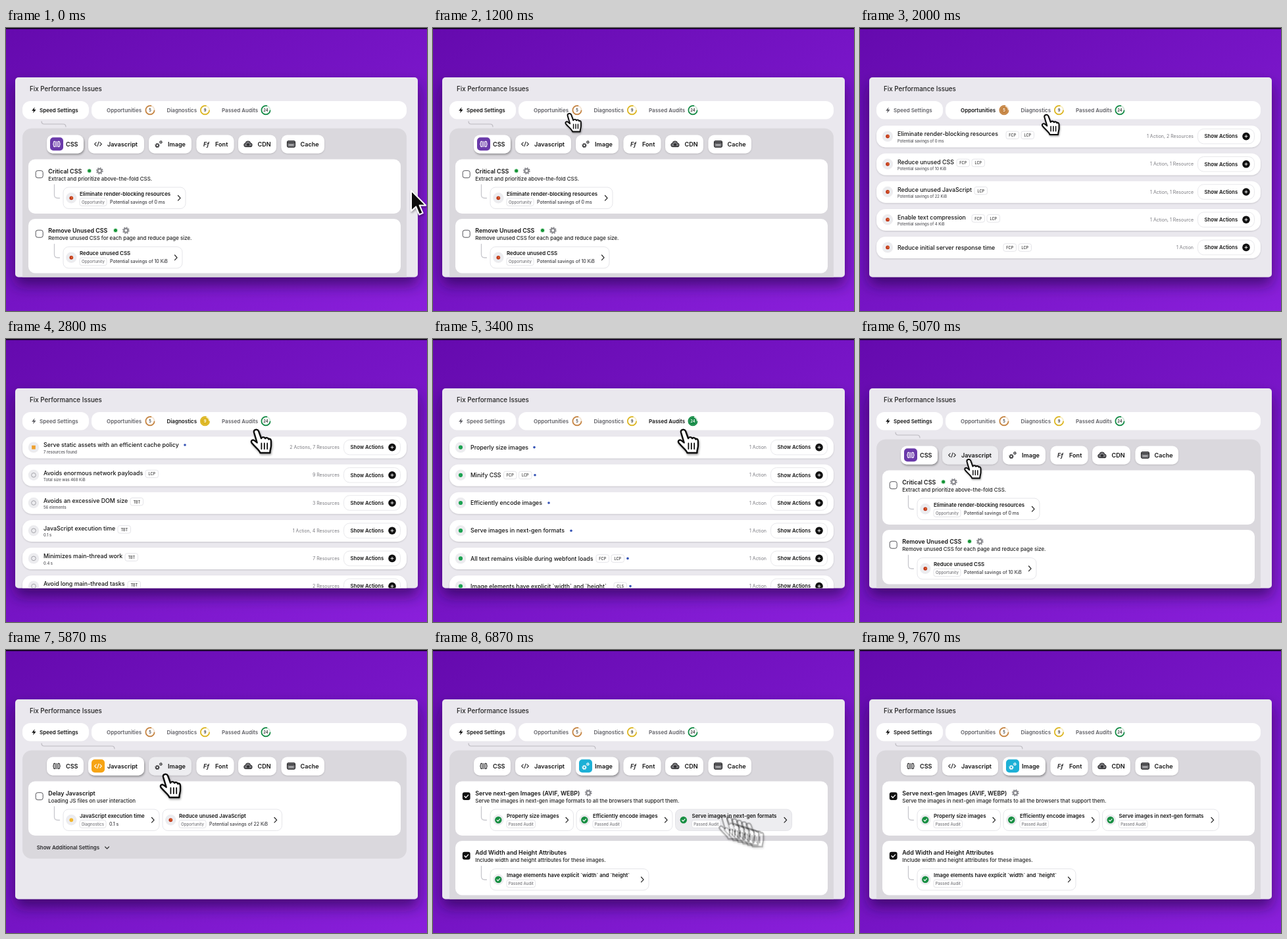
Recreate the animation shown at these times as an HTML page. Size 640 by 430 pixels, loop 8070 ms.

```html
<!DOCTYPE html>
<html lang="en">
<head>
<meta charset="utf-8">
<title>Fix Performance Issues</title>
<style>
html, body { margin: 0; width: 100%; height: 100%; overflow: hidden; background: #6f10bd; }
svg { display: block; width: 640px; height: 430px; font-family: Inter, "Open Sans", sans-serif; }
</style>
</head>
<body>
<svg id="stage" viewBox="0 0 640 430" xmlns="http://www.w3.org/2000/svg">
  <defs>
    <linearGradient id="bg" x1="0" y1="0" x2="1" y2="1">
      <stop offset="0" stop-color="#650aae"/>
      <stop offset=".5" stop-color="#7614c5"/>
      <stop offset="1" stop-color="#8a1fdb"/>
    </linearGradient>
    <filter id="deep" x="-10%" y="-10%" width="120%" height="130%">
      <feDropShadow dx="0" dy="12" stdDeviation="11" flood-color="#1c0038" flood-opacity=".6"/>
    </filter>
    <filter id="soft" x="-20%" y="-30%" width="140%" height="180%">
      <feDropShadow dx="0" dy="1" stdDeviation="1.2" flood-color="#000" flood-opacity=".16"/>
    </filter>
    <filter id="lift" x="-30%" y="-30%" width="160%" height="170%">
      <feDropShadow dx="1" dy="2" stdDeviation="1.5" flood-color="#000" flood-opacity=".35"/>
    </filter>
    <clipPath id="panel"><rect x="14" y="75" width="612" height="303.5" rx="5"/></clipPath>
  </defs>
  <rect width="640" height="430" fill="url(#bg)"/>
  <rect width="640" height="1.5" fill="#08000f"/>
  <rect x="14" y="75" width="612" height="303.5" rx="5" fill="#eae8ee" filter="url(#deep)"/>
  <g id="app" clip-path="url(#panel)"></g>
  <g id="pointer"></g>
</svg>
<script>
const LOOP = 8070;
const $ = id => document.getElementById(id);

// ---------- drawing helpers ----------
const txt = (x, y, s, size, weight = 500, fill = '#151515', extra = '') =>
  `<text x="${x}" y="${y}" font-size="${size}" font-weight="${weight}" fill="${fill}" ${extra}>${s.replace(/</g, '&lt;')}</text>`;
const box = (x, y, w, h, r, fill = '#fff', extra = '') =>
  `<rect x="${x}" y="${y}" width="${w}" height="${h}" rx="${r}" fill="${fill}" ${extra}/>`;
const dot = (x, y, r, fill, extra = '') => `<circle cx="${x}" cy="${y}" r="${r}" fill="${fill}" ${extra}/>`;
const line = (d, color = '#151515', w = 1.2) =>
  `<path d="${d}" fill="none" stroke="${color}" stroke-width="${w}" stroke-linecap="round" stroke-linejoin="round"/>`;
const at = (x, y, s) => `<g transform="translate(${x} ${y})">${s}</g>`;
const mid = 'text-anchor="middle"';
const edge = c => `stroke="${c}" stroke-width=".8"`;

const gear = (x, y, r = 4, c = '#8b8b90') =>
  `<circle cx="${x}" cy="${y}" r="${r * .75}" fill="none" stroke="${c}" stroke-width="${r * .55}"/>` +
  `<circle cx="${x}" cy="${y}" r="${r * 1.15}" fill="none" stroke="${c}" stroke-width="${r * .4}" stroke-dasharray="${r * .45}"/>`;

const badge = (x, y, w, s) =>
  box(x, y, w, 11.5, 3, '#fff', edge('#dddde2')) + txt(x + w / 2, y + 8.1, s, s.length < 4 ? 5.6 : 6.1, 500, s.length < 4 ? '#333' : '#77777c', mid);

const status = {
  red: dot(0, 0, 2.9, '#c23a1e') + dot(.7, -.3, 1, '#e8812c'),
  amber: box(-2.8, -2.8, 5.6, 5.6, .5, '#eea02f'),
  yellow: dot(0, 0, 2.9, '#f2b62c'),
  none: dot(0, 0, 3.3, 'none', 'stroke="#a5a5ab" stroke-width="1"'),
  green: dot(0, 0, 3.1, '#1da352'),
  pass: dot(0, 0, 5.2, '#178f42') + line('M-2.1 .2L-.6 1.8L2.3 -1.5', '#fff', 1.1)
};
const statusIcon = (x, y, kind) => dot(x, y, 8.2, '#ececef') + at(x, y, status[kind]);

// ---------- header ----------
const heads = [
  { label: 'Opportunities', x: 153, rx: 219, n: 5, color: '#c58442', pale: '#f3e2d0' },
  { label: 'Diagnostics', x: 244.5, rx: 302.5, n: 9, color: '#dcb521', pale: '#f8efc4' },
  { label: 'Passed Audits', x: 328, rx: 395, n: 24, color: '#138a45', pale: '#cfe8d8' }
];
function header(active) {
  const speed = active < 0, c = speed ? '#151515' : '#606066';
  let s = txt(36, 96, 'Fix Performance Issues', 9.8, 500, '#222') +
    box(25, 111, 101, 27.5, 12) + box(130, 111, 479, 27.5, 12) +
    `<path d="M43.6 120.3L39.2 125.8H42L41 129.6L45.6 123.9H42.8Z" fill="${c}"/>` +
    txt(51, 127.8, 'Speed Settings', 8, 600, c);
  heads.forEach((h, i) => {
    const on = i === active;
    s += txt(h.x, 127.8, h.label, 8, 600, on ? '#151515' : '#606066') +
      dot(h.rx, 124.7, 6.6, on ? h.color : '#fff', `stroke="${h.pale}" stroke-width="1.7"`) +
      dot(h.rx, 124.7, 6.6, 'none', `stroke="${h.color}" stroke-width="1.7" stroke-dasharray="33 8.5"`) +
      txt(h.rx, 126.9, '' + h.n, 5.8, 600, on ? '#fff' : '#333', mid);
  });
  return s;
}

// ---------- audit lists ----------
// row: title, note, right label, status, tags, first tag x, dot x
function list(rows) {
  return rows.map(([title, note, right, kind, tags = [], tx = 0, bx = 0], i) => {
    const y = 164.6 + i * 42.2;
    return box(25, y - 16.3, 584, 33, 14, '#fff', 'filter="url(#soft)"') + statusIcon(42, y, kind) +
      txt(57, y + (note ? -.3 : 3.2), title, 8.85, 500) +
      (note ? txt(57, y + 9.2, note, 5.9, 500, '#55555a') : '') +
      tags.map((t, k) => badge(tx + k * 23, y - 5.6 - (note ? 2 : 0), 19.5, t)).join('') +
      (bx ? dot(bx, y - (note ? 3.6 : 0), 1.8, '#3553b5') : '') +
      txt(507, y + 2.5, right, 7, 400, '#7b7b80', 'text-anchor="end"') +
      box(513.5, y - 11.3, 86, 22.6, 9, '#fff', edge('#e2e2e6')) +
      txt(523.5, y + 2.8, 'Show Actions', 7.65, 600) +
      dot(587, y, 5.8, '#111') + line(`M585 ${y}h4M587 ${y - 2}v4`, '#fff', .9);
  }).join('');
}
const savings = s => 'Potential savings of ' + s;
const lists = [
  list([
    ['Eliminate render-blocking resources', savings('0 ms'), '1 Action, 2 Resources', 'red', ['FCP', 'LCP'], 222],
    ['Reduce unused CSS', savings('10 KiB'), '1 Action, 1 Resource', 'red', ['FCP', 'LCP'], 147],
    ['Reduce unused JavaScript', savings('22 KiB'), '1 Action, 1 Resource', 'red', ['LCP'], 174],
    ['Enable text compression', savings('4 KiB'), '1 Action, 1 Resource', 'red', ['FCP', 'LCP'], 170],
    ['Reduce initial server response time', '', '1 Action', 'red', ['FCP', 'LCP'], 218]
  ]),
  list([
    ['Serve static assets with an efficient cache policy', '7 resources found', '2 Actions, 7 Resources', 'amber', [], 0, 272],
    ['Avoids enormous network payloads', 'Total size was 468 KiB', '9 Resources', 'none', ['LCP'], 212],
    ['Avoids an excessive DOM size', '56 elements', '3 Resources', 'none', ['TBT'], 189],
    ['JavaScript execution time', '0.1 s', '1 Action, 4 Resources', 'none', ['TBT'], 170],
    ['Minimizes main-thread work', '0.4 s', '7 Resources', 'none', ['TBT'], 181],
    ['Avoid long main-thread tasks', '1 long task found', '2 Resources', 'none', ['TBT'], 185]
  ]),
  list([
    ['Properly size images', '', '1 Action', 'green', [], 0, 154],
    ['Minify CSS', '', '1 Action', 'green', ['FCP', 'LCP'], 107.5, 155],
    ['Efficiently encode images', '', '1 Action', 'green', [], 0, 176],
    ['Serve images in next-gen formats', '', '1 Action', 'green', [], 0, 210],
    ['All text remains visible during webfont loads', '', '1 Action', 'green', ['FCP', 'LCP'], 248, 296],
    ['Image elements have explicit `width` and `height`', '', '1 Action', 'green', ['CLS'], 275, 300]
  ])
];

// ---------- speed settings ----------
const icons = [
  c => line('M-2.2 -4H-3.4Q-4.6 -4 -4.6 -2.6V-1L-5.3 0L-4.6 1V2.6Q-4.6 4 -3.4 4H-2.2ZM2.2 -4H3.4Q4.6 -4 4.6 -2.6V-1L5.3 0L4.6 1V2.6Q4.6 4 3.4 4H2.2ZM0 -4V4', c, 1.1),
  c => line('M-2.8 -2.6L-5.4 0L-2.8 2.6M2.8 -2.6L5.4 0L2.8 2.6M1 -3.4L-1 3.4', c, 1.1),
  c => gear(-2, 2, 2.7, c) + gear(3.4, -3, 1.9, c),
  c => txt(0, 3.2, 'Ff', 9, 700, c, mid + ' font-style="italic"'),
  c => `<path d="M-3 4C-7 4 -7 -.8 -3.8 -1.2C-3.2 -5.4 3 -5.4 3.5 -1.4C7 -1 6.8 4 3.2 4Z" fill="#77777b" stroke="${c}" stroke-width="1.1"/>` +
    dot(0, .8, 2, c),
  c => box(-6, -4.7, 12, 9.4, 2, '#77777b', `stroke="${c}" stroke-width="1.2"`) + line('M-5.4 -2H5.4', c, 1.4) + line('M-3 1.4H3', '#ddd', 1)
];
const tabs = [
  ['CSS', 62, 56, 91], ['Javascript', 125, 85, 154], ['Image', 217, 65, 246],
  ['Font', 289.5, 57, 318], ['CDN', 353, 58, 382.5], ['Cache', 418.5, 65.5, 447.5]
];
const tints = ['#6a3aaa', '#f6a414', '#1cb0d6'];
const tabBar = active => tabs.map(([name, x, w, tx], i) => {
  const on = i === active;
  return box(x, 162.5, w, 28, 9, '#fff', `class="hot" filter="url(#${on ? 'lift' : 'soft'})" ${on ? 'data-on="1"' : ''}`) +
    (on ? box(x + 5, 166.3, 20, 20, 5, tints[i]) : '') +
    at(x + 15, 176.4, icons[i](on ? '#fff' : '#2c2c2e')) + txt(tx, 179.8, name, 9.1, 600);
}).join('');

const badgeW = { Opportunity: 41, Diagnostics: 40, 'Passed Audit': 43.5 };
const chip = (y, x, right, kind, title, tag, note = '') =>
  box(x, y + 42.5, right - x, 32.5, 8, '#fff', 'class="hot" ' + edge('#dfdfe4')) +
  statusIcon(x + 12.3, y + 58.8, kind) +
  txt(x + 25, y + 55.3, title, 7.9, 600) + badge(x + 25, y + 59.2, badgeW[tag], tag) +
  txt(x + 30 + badgeW[tag], y + 67.2, note, 7, 500, '#3c3c40') +
  line(`M${right - 11.5} ${y + 55}l3.6 3.8l-3.6 3.8`, '#222', 1.2);

function card(y, on, title, sub, marks, chips) {
  return box(34, y, 566, 82.5, 10) +
    (on ? box(44.8, y + 16.8, 11.8, 11.8, 3, '#111') + line(`M48 ${y + 22.8}l2 2.1l3.6 -4`, '#fff', 1.4)
        : box(45.2, y + 17.2, 11, 11, 3, '#fff', 'stroke="#55555a" stroke-width="1"')) +
    txt(64.3, y + 21, title, 8.9, 600) + txt(64.3, y + 32.4, sub, 7.9, 500, '#222') +
    (marks.length > 1 ? dot(marks[0], y + 17.6, 3.6, '#cfeed6') + dot(marks[0], y + 17.6, 2.5, '#149236') : '') +
    (marks.length ? gear(marks[marks.length - 1], y + 17.6) : '') +
    line(`M73.5 ${y + 38.5}v15.5q0 5 5 5h3`, '#c8c8cd', 1.3) +
    chips.map(c => chip(y, ...c)).join('');
}
const Y1 = 199.5, Y2 = 290;
const cards = [
  card(Y1, false, 'Critical CSS', 'Extract and prioritize above-the-fold CSS.', [126.7, 142.3],
    [[87, 273, 'red', 'Eliminate render-blocking resources', 'Opportunity', savings('0 ms')]]) +
  card(Y2, false, 'Remove Unused CSS', 'Remove unused CSS for each page and reduce page size.', [166.5, 182.3],
    [[87, 268, 'red', 'Reduce unused CSS', 'Opportunity', savings('10 KiB')]]),
  card(Y1, false, 'Delay Javascript', 'Loading JS files on user interaction', [], [
    [87, 233, 'yellow', 'JavaScript execution time', 'Diagnostics', '0.1 s'],
    [238, 419.5, 'red', 'Reduce unused JavaScript', 'Opportunity', savings('22 KiB')]]) +
  txt(46.7, 303.4, 'Show Additional Settings', 7.9, 600, '#2a2a2d') + line('M150.6 299l3 3l3 -3', '#333', 1.1),
  card(Y1, true, 'Serve next-gen Images (AVIF, WEBP)', 'Serve the images in next-gen image formats to all the browsers that support them.', [236.2], [
    [87, 213.5, 'pass', 'Properly size images', 'Passed Audit'],
    [218, 364, 'pass', 'Efficiently encode images', 'Passed Audit'],
    [368.5, 545.5, 'pass', 'Serve images in next-gen formats', 'Passed Audit']]) +
  card(Y2, true, 'Add Width and Height Attributes', 'Include width and height attributes for these images.', [],
    [[87, 328, 'pass', 'Image elements have explicit `width` and `height`', 'Passed Audit']])
];
const settings = i => box(25, 152.5, 584, i === 1 ? 164.5 : 260, 14, '#dad8dd') + tabBar(i) + cards[i];

// ---------- assemble views: css, js, image, then the three lists ----------
const bodies = [0, 1, 2].map(i => header(-1) + settings(i)).concat(lists.map((l, i) => header(i) + l));
$('app').innerHTML = bodies.map(b => `<g class="view">${b}</g>`).join('') +
  '<path id="link" fill="none" stroke="#bdbbc1" stroke-width="1.2"/>';
const views = [...document.querySelectorAll('.view')];
const hots = views.map(v => [...v.querySelectorAll('.hot')].map(el => {
  const [x, y, w, h] = ['x', 'y', 'width', 'height'].map(k => +el.getAttribute(k));
  return { el, x, y, w, h, on: el.dataset.on };
}));

const GHOSTS = 6;
const arrow = '<path d="M0 0V31L7.2 24.4L12.2 36.5L17.6 34.2L12.6 22.4H22Z" fill="#0a0a0a" stroke="#fff" stroke-width="2" stroke-linejoin="round"/>';
const hand = '<path d="M-3 3C-4 -1.5 2 -3 4 1L8 12C9 9.5 13 9.5 14 12.2C15 10.4 18.6 10.6 19.4 13.4C21 12 23 13.4 23 16.5V23C23 27 21.3 29 21.3 34H6.5C5.5 30 -1.5 25 -6.3 19C-8.6 15.4 -4.8 13 -2 15.6L1.6 18.4Z" fill="#fff" stroke="#0a0a0a" stroke-width="2.4" stroke-linejoin="round"/>' +
  line('M8.4 19.5V28M12.8 19.5V28M17.2 19.5V28', '#0a0a0a', 1.8);
$('pointer').innerHTML = Array.from({ length: GHOSTS }, () =>
  `<g filter="url(#lift)"><g>${arrow}</g><g>${hand}</g></g>`).join('');
const ghosts = [...$('pointer').children];

// ---------- timeline ----------
const moves = [ // start, end, x, y
  [0, 0, 616, 247], [90, 960, 207, 131], [1480, 1930, 283, 133], [2230, 2700, 380, 139],
  [3420, 3960, 85, 131], [4560, 4980, 165, 184], [5360, 5780, 242, 190], [6450, 7250, 655, 320]
];
const clicks = [1200, 2080, 3000, 4270, 5120, 6040];
const order = [0, 3, 4, 5, 0, 1, 2];
const clamp = v => Math.max(0, Math.min(1, v));
const ease = u => u < .5 ? 4 * u ** 3 : 1 - 4 * (1 - u) ** 3;

function place(t) {
  let [, , x, y] = moves[0];
  for (const [a, b, mx, my] of moves.slice(1)) {
    const k = ease(clamp((t - a) / (b - a)));
    x += (mx - x) * k;
    y += (my - y) * k;
  }
  return [x, y];
}

function render(t) {
  const step = clicks.filter(c => t >= c + 70).length;
  const now = order[step];
  views.forEach((v, i) => v.style.display = i === now ? '' : 'none');

  const ends = [91, 165, 247];
  const link = $('link');
  link.style.display = now < 3 ? '' : 'none';
  if (now < 3) {
    const from = ends[Math.max(0, now - 1)];
    const x = from + (ends[now] - from) * ease(clamp((t - clicks[step - 1] - 70) / 350) || 0);
    link.setAttribute('d', `M54 141.5q0 4.5 4 4.5H${x - 4}q4 0 4 4.5`);
  }

  const [px, py] = place(t), [qx, qy] = place(Math.max(0, t - 30));
  const fast = Math.hypot(px - qx, py - qy) > 5;
  let over = false;
  for (const h of hots[now]) {
    const hit = px > h.x && px < h.x + h.w && py > h.y && py < h.y + h.h;
    over = over || hit;
    h.el.setAttribute('fill', hit && !h.on ? '#ededf0' : '#fff');
  }
  const pointing = over || py < 192;
  const press = Math.max(...clicks.map(c => clamp(1 - Math.abs(t - c) / 150)));
  const scale = 1 - .22 * Math.sin(press * Math.PI / 2);
  ghosts.forEach((g, i) => {
    const [x, y] = place(Math.max(0, t - i * 5));
    g.style.display = t < 7250 && (!i || fast) ? '' : 'none';
    g.setAttribute('opacity', fast ? .28 : 1);
    g.setAttribute('transform', `translate(${x.toFixed(2)} ${y.toFixed(2)}) scale(${scale.toFixed(3)})`);
    g.children[0].style.display = pointing ? 'none' : '';
    g.children[1].style.display = pointing ? '' : 'none';
  });
}

const start = performance.now();
function tick() {
  render((performance.now() - start) % LOOP);
  requestAnimationFrame(tick);
}
tick();
</script>
</body>
</html>
```
